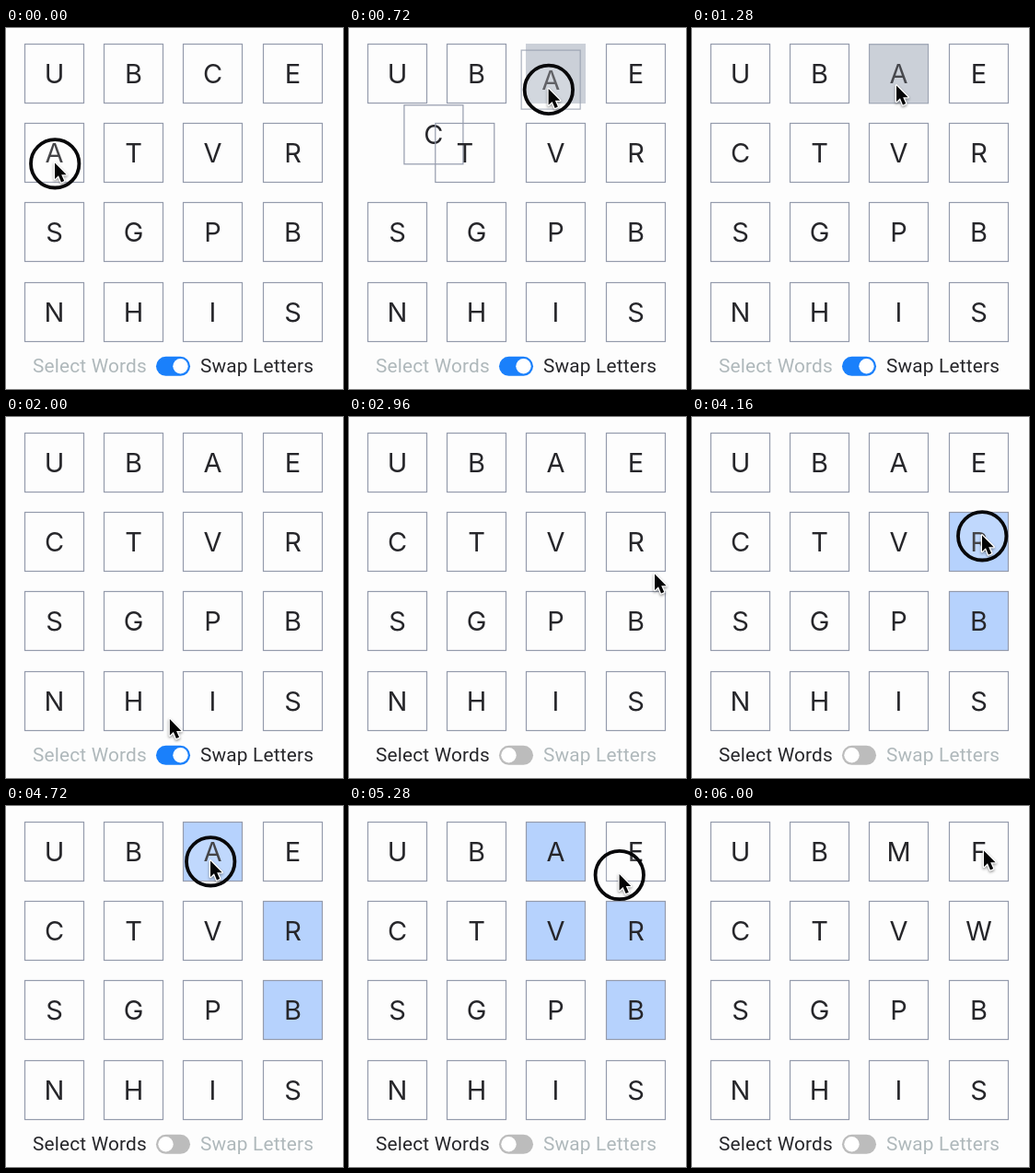
An HTML page with a canvas for the animation above (8 s loop, 366x392 px).

```html
<!DOCTYPE html>
<html lang="en">
<head>
<meta charset="utf-8">
<title>Letter grid</title>
<style>
html, body { margin: 0; width: 100%; height: 100%; overflow: hidden; background: #fdfdfd; }
canvas { display: block; width: 366px; height: 392px; }
</style>
</head>
<body>
<canvas id="stage" width="366" height="392"></canvas>
<script>
const ctx = document.getElementById('stage').getContext('2d');
const LOOP = 8000, STEP = 80, LAST = 6000;
const SIZE = 64, PITCH = 86.2;
const INK = '#26262a', MUTED = '#afb8bb';

// Events, in ms
const GRAB = 160, OVER_T = 551, OVER_C = 626, DROP = 1120;
const TOGGLE = 2400, PRESS = 3280, CLEAR = 5840;

// Where the pointer slows down, and the cell it selects there
const stops = [
  { at: GRAB, x: 53, y: 145 },
  { at: 800, x: 224, y: 61 },
  { at: 1280, x: 222, y: 61 },
  { at: 1760, x: 179, y: 275 },
  { at: 2200, x: 177, y: 366 },
  { at: 2560, x: 177, y: 366 },
  { at: 2960, x: 332, y: 169 },
  { at: 3360, x: 319, y: 223, cell: 11 },
  { at: 3760, x: 319, y: 223 },
  { at: 4160, x: 315, y: 127, cell: 7 },
  { at: 4720, x: 222, y: 58, cell: 2 },
  { at: 5040, x: 217, y: 147, cell: 6 },
  { at: 5390, x: 317, y: 50, cell: 3 },
  { at: LAST, x: 317, y: 47 }
];

const clamp = v => Math.max(0, Math.min(1, v));
const smooth = p => p * p * (3 - 2 * p);
const mix = (a, b, p) => a + (b - a) * p;
const mixPoint = (a, b, p) => ({ x: mix(a.x, b.x, p), y: mix(a.y, b.y, p) });
const slot = i => ({
  x: Math.round(20 + (i % 4) * PITCH) + 0.5,
  y: Math.round(17 + Math.floor(i / 4) * PITCH) + 0.5
});

// Same curve as the CSS "ease" keyword
function ease(x) {
  if (x <= 0) return 0;
  if (x >= 1) return 1;
  let lo = 0, hi = 1, u = 0.5;
  for (let i = 0; i < 20; i++) {
    u = (lo + hi) / 2;
    const bx = 0.75 * u * (1 - u) ** 2 + 0.75 * u * u * (1 - u) + u ** 3;
    if (bx < x) lo = u; else hi = u;
  }
  return 0.3 * u * (1 - u) ** 2 + 3 * u * u * (1 - u) + u ** 3;
}

function pointer(t) {
  const i = Math.max(1, stops.findIndex(s => s.at >= t));
  const a = stops[i - 1], b = stops[i];
  return mixPoint(a, b, smooth(clamp((t - a.at) / (b.at - a.at))));
}

const pressed = t => t < DROP || Math.abs(t - TOGGLE) < 120 || (t >= PRESS && t < CLEAR);

function fillCell(i, color) {
  const { x, y } = slot(i);
  ctx.fillStyle = color;
  ctx.fillRect(x - 0.5, y - 0.5, SIZE + 1, SIZE + 1);
}

function tile(letter, { x, y }, alpha = 1) {
  ctx.globalAlpha = alpha;
  ctx.strokeStyle = '#949bac';
  ctx.lineWidth = 1.2;
  ctx.strokeRect(x, y, SIZE, SIZE);
  ctx.fillStyle = INK;
  ctx.font = '400 29px Inter, "Open Sans", sans-serif';
  ctx.textAlign = 'center';
  ctx.letterSpacing = '0px';
  ctx.fillText(letter, x + SIZE / 2, y + 42.5);
  ctx.globalAlpha = 1;
}

function board(t) {
  const cleared = t >= CLEAR;
  const letters = [...(cleared ? 'UBMFCTVWSGPBNHIS' : 'UBCEATVRSGPBNHIS')];
  const held = t >= GRAB && t < DROP + 250;
  const toC = ease((t - OVER_C) / 200);

  if (held) fillCell(t < OVER_T ? 4 : t < OVER_C ? 5 : 2, '#cbd0d8');
  if (!cleared) {
    for (const { at, cell } of stops) if (cell && t >= at - 80) fillCell(cell, '#b6d2fd');
  }

  letters.forEach((letter, i) => {
    let pos = slot(i);
    if (!cleared) {
      if (i === 4 && held) return;
      if (i === 4 && t >= DROP) pos = slot(2);
      if (i === 2) pos = mixPoint(pos, slot(4), toC);
      if (i === 5) {
        const out = ease((Math.min(t, OVER_C) - OVER_T) / 200);
        pos = mixPoint(pos, slot(4), out * (1 - toC));
      }
    }
    tile(letter, pos);
  });

  if (held) {
    const tip = pointer(Math.min(t, DROP));
    const drag = { x: tip.x - 29.5, y: tip.y - 40.5 };
    tile('A', mixPoint(drag, slot(2), ease((t - DROP) / 250)), 0.8);
  }
}

function label(text, x, color) {
  ctx.font = '400 20.8px Roboto, Arial, sans-serif';
  ctx.textAlign = 'left';
  ctx.letterSpacing = '0.195px';
  ctx.fillStyle = color;
  ctx.fillText(text, x, 374);
}

function footer(t) {
  const on = t < TOGGLE;
  label('Select Words', 29, on ? MUTED : INK);
  label('Swap Letters', 211, on ? INK : MUTED);
  ctx.fillStyle = on ? '#1a80fb' : '#bcbcbc';
  ctx.beginPath();
  ctx.roundRect(163, 356.8, 37, 21, 10.5);
  ctx.fill();
  ctx.fillStyle = '#fff';
  ctx.beginPath();
  ctx.arc(mix(189.5, 173.5, ease((t - TOGGLE) / 150)), 367.3, 8.2, 0, Math.PI * 2);
  ctx.fill();
}

function ring({ x, y }) {
  ctx.beginPath();
  ctx.arc(x + 0.2, y + 2.3, 26.2, 0, Math.PI * 2);
  ctx.fillStyle = 'rgba(255,255,255,.14)';
  ctx.fill();
  ctx.strokeStyle = '#08080a';
  ctx.lineWidth = 3.8;
  ctx.stroke();
}

function arrow({ x, y }) {
  const shape = new Path2D('M0 0V17.6L4 13.9L7 21L10.2 19.6L7.2 12.8H12.6Z');
  ctx.save();
  ctx.translate(x, y + 1.4);
  ctx.lineJoin = 'round';
  ctx.lineWidth = 2.6;
  ctx.strokeStyle = '#fff';
  ctx.shadowColor = 'rgba(0,0,0,.4)';
  ctx.shadowBlur = 3;
  ctx.shadowOffsetY = 1.5;
  ctx.stroke(shape);
  ctx.shadowColor = 'transparent';
  ctx.fillStyle = '#050506';
  ctx.fill(shape);
  ctx.restore();
}

function draw(t) {
  ctx.fillStyle = '#fdfdfd';
  ctx.fillRect(0, 0, 366, 392);
  board(t);
  footer(t);
  const tip = pointer(t);
  if (pressed(t)) ring(tip);
  arrow(tip);
}

const start = performance.now();
function frame() {
  const t = (performance.now() - start) % LOOP;
  draw(Math.min(LAST, Math.floor(t / STEP) * STEP));
  requestAnimationFrame(frame);
}
frame();
</script>
</body>
</html>
```
